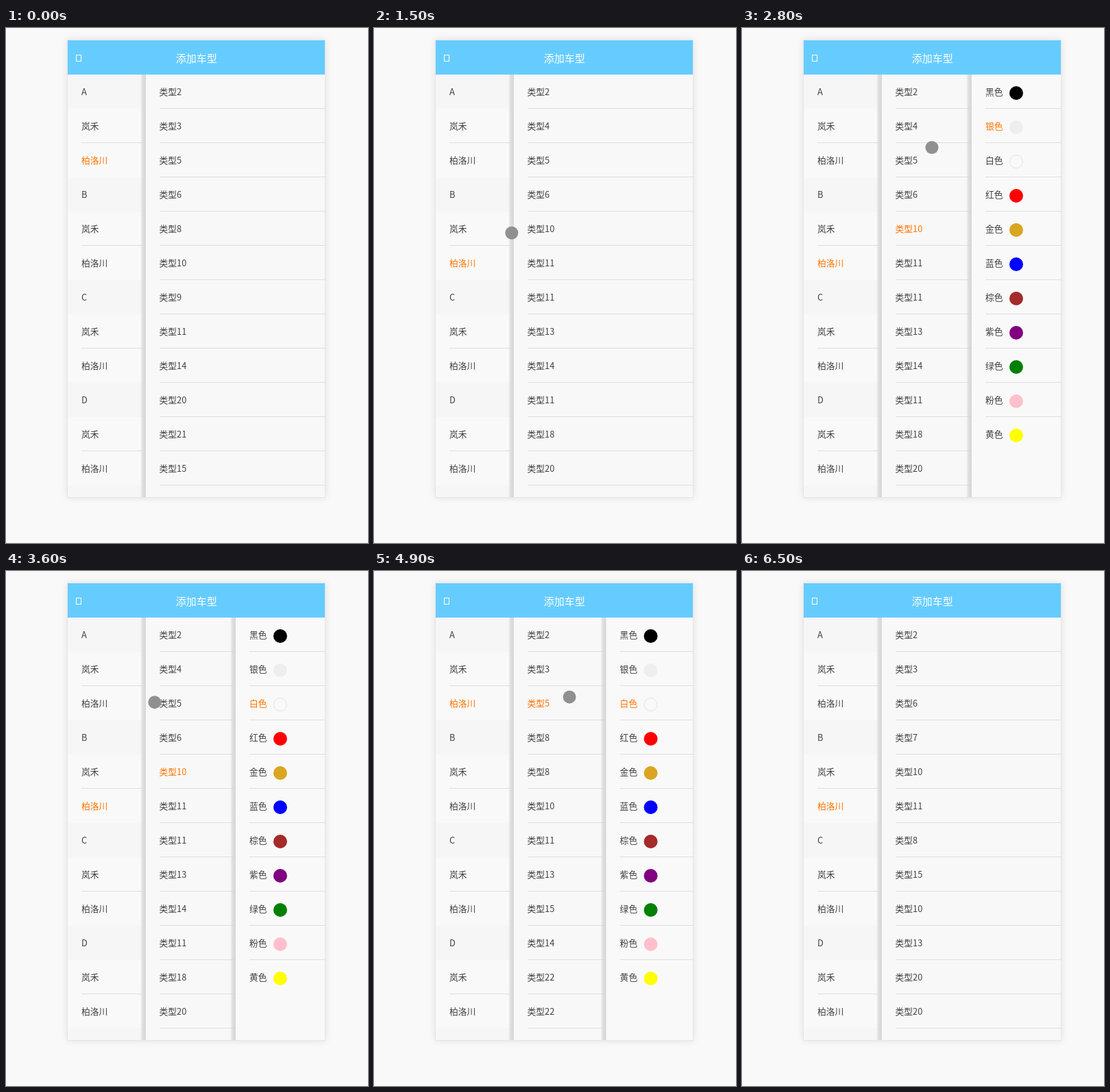
Write an HTML page with a canvas that moves like this. It is 528x752 px and loops after 7500 ms.

```html
<!DOCTYPE html>
<html lang="zh-CN">
<head>
<meta charset="utf-8">
<title>添加车型</title>
<style>
html, body { margin: 0; width: 100%; height: 100%; overflow: hidden; background: #f9f9f9; }
canvas { display: block; }
</style>
</head>
<body>
<canvas id="stage" width="528" height="752"></canvas>
<script>
const ctx = document.getElementById('stage').getContext('2d');
const LOOP = 7500, TICK = 100;
const LEFT = 90, RIGHT = 465, TOP = 68, BOTTOM = 685, ROW = 50, ROWS = 12;
const TYPES_X = 204, DRAWER_WIDTH = 130, SLIDE = 400, TAP = 150;
const FONT = '"Noto Sans CJK SC", "Noto Sans CJK JP", "Noto Sans CJK", sans-serif';
const INK = '#404040', ACTIVE = '#ff7300', LINE = '#dedede';

const brands = ['A', 'B', 'C', 'D'].flatMap(letter => [letter, '岚禾', '柏洛川']);
const colors = Object.entries({
  黑色: 'black', 银色: '#eee', 白色: '#f9f9f9', 红色: 'red', 金色: 'goldenrod', 蓝色: 'blue',
  棕色: 'brown', 紫色: 'purple', 绿色: 'green', 粉色: 'pink', 黄色: 'yellow'
});

// Pointer stops: it waits from at - rest to at + hold, and taps a row where a list is named.
const stops = [
  { at: 100, x: 456, y: 105 },
  { at: 1200, x: 153.5, y: 326.5, rest: 300, list: 'brand', row: 5 },
  { at: 1798, x: 247.5, y: 272.5, list: 'type', row: 4 },
  { at: 2600, x: 138, y: 153, rest: 0 },
  { at: 3250, x: 416, y: 196, rest: 250, list: 'color', row: 2 },
  { at: 3832, x: 141, y: 190, list: 'brand', row: 2 },
  { at: 4585, x: 285.5, y: 183.5, hold: 300, list: 'type', row: 2 },
  { at: 5480, x: 137, y: 333, list: 'brand', row: 5 },
  { at: 6200, x: 460.5, y: 481, rest: 0 },
  { at: 6400, x: 499, y: 78, rest: 0 }
].map(stop => ({ rest: 100, hold: stop.list ? 100 : 0, ...stop }));
const taps = stops.filter(stop => stop.list);

const smooth = k => k * k * (3 - 2 * k);

// CSS "ease": cubic-bezier(.25, .1, .25, 1)
function ease(x) {
  if (x >= 1) return 1;
  const bezier = (a, b, s) => 3 * a * s * (1 - s) ** 2 + 3 * b * s * s * (1 - s) + s ** 3;
  let low = 0, high = 1;
  for (let i = 0; i < 24; i++) {
    const mid = (low + high) / 2;
    if (bezier(.25, .25, mid) < x) low = mid; else high = mid;
  }
  return bezier(.1, 1, low);
}

// Type numbers rise at random down the list; every load has its own seed.
function typeNumber(row, load) {
  const wave = Math.sin((row + 1) * 12.9898 + load * 78.233) * 43758.5453;
  const random = wave - Math.floor(wave);
  return row + 2 + Math.floor(random * (row + 1));
}

function stateAt(t) {
  const state = { brand: 2, type: -1, color: 1, load: 0, openness: 0 };
  for (const tap of taps) {
    if (tap.at > t) break;
    state[tap.list] = tap.row;
    const slide = ease((t - tap.at) / SLIDE);
    if (tap.list === 'type') state.openness = slide;
    if (tap.list === 'brand') {
      if (state.load++) state.openness = 1 - slide;
      state.type = -1;
    }
  }
  return state;
}

function pointerAt(t) {
  const next = stops.findIndex(stop => t <= stop.at + stop.hold);
  if (next < 0 || t < stops[0].at) return null;
  const to = stops[next], from = stops[Math.max(0, next - 1)];
  const leave = from.at + from.hold, arrive = to.at - to.rest;
  const k = t >= arrive ? 1 : smooth((t - leave) / (arrive - leave));
  return [from.x + (to.x - from.x) * k, from.y + (to.y - from.y) * k];
}

function rect(x, y, w, h, fill) {
  ctx.fillStyle = fill;
  ctx.fillRect(x, y, w, h);
}

function circle(x, y, r, fill, stroke) {
  ctx.beginPath();
  ctx.arc(x, y, r, 0, Math.PI * 2);
  ctx.fillStyle = fill;
  ctx.fill();
  if (!stroke) return;
  ctx.strokeStyle = stroke;
  ctx.lineWidth = 1;
  ctx.stroke();
}

function label(text, x, row, active) {
  ctx.font = '12.8px ' + FONT;
  ctx.textAlign = 'left';
  ctx.fillStyle = active ? ACTIVE : INK;
  ctx.fillText(text, x, TOP + row * ROW + 30);
}

function separator(x, end, row) {
  rect(x, TOP + row * ROW + 49, end - x, 1, LINE);
}

function edgeShadow(x) {
  const shade = ctx.createLinearGradient(x - 8, 0, x, 0);
  shade.addColorStop(0, 'rgba(205,205,205,0)');
  shade.addColorStop(.45, 'rgba(212,212,212,.75)');
  shade.addColorStop(1, 'rgba(212,212,212,.9)');
  rect(x - 8, TOP, 8, BOTTOM - TOP, shade);
}

function drawFrame() {
  rect(0, 0, 528, 752, '#f9f9f9');
  ctx.save();
  ctx.shadowColor = 'rgba(0,0,0,.1)';
  ctx.shadowBlur = 10;
  rect(LEFT - 1, 17, RIGHT - LEFT + 2, 669, '#e4e6e8');
  ctx.restore();
  rect(LEFT, 18, RIGHT - LEFT, BOTTOM - 18, '#f8f8f8');
  rect(LEFT, 18, RIGHT - LEFT, 50, '#66ccff');
  ctx.strokeStyle = '#fff';
  ctx.lineWidth = 1;
  ctx.strokeRect(102.5, 39.5, 7, 9);
  ctx.font = '500 15px ' + FONT;
  ctx.textAlign = 'center';
  ctx.fillStyle = '#fff';
  ctx.fillText('添加车型', 277.75, 49.5);
}

function drawBrands(selected) {
  rect(LEFT, TOP, TYPES_X - LEFT, BOTTOM - TOP, '#f6f6f6');
  brands.forEach((name, row) => {
    const kind = row % 3;
    if (kind) rect(LEFT, TOP + row * ROW, TYPES_X - LEFT, ROW, '#f9f9f9');
    label(name, 110, row, row === selected);
    if (kind === 1) separator(110, 199, row);
  });
}

function drawTypes(load, selected, edge) {
  for (let row = 0; row < ROWS; row++) {
    label('类型' + typeNumber(row, load), 223.5, row, row === selected);
    separator(224, edge, row);
  }
  edgeShadow(TYPES_X);
}

function drawDrawer(x, selected) {
  if (x >= RIGHT - .5) return;
  rect(x, TOP, RIGHT - x, BOTTOM - TOP, '#f9f9f9');
  edgeShadow(x);
  colors.forEach(([name, fill], row) => {
    const pale = name === '白色';
    label(name, x + 20, row, row === selected);
    circle(x + 65, TOP + row * ROW + 27, pale ? 9.5 : 10, fill, pale && '#e3e3e3');
    if (row < colors.length - 1) separator(x + 20, RIGHT, row);
  });
}

function drawTap(tap, drawerX) {
  const spans = { brand: [110, 198], type: [225, drawerX - 5], color: [drawerX + 20, RIGHT] };
  const [x, end] = spans[tap.list];
  rect(x, TOP + tap.row * ROW, end - x, ROW, 'rgba(55,191,238,.3)');
}

function drawPointer(t, pressed) {
  const position = pointerAt(t);
  if (!position) return;
  if (pressed) circle(...position, 10.5, 'rgba(255,255,255,.5)');
  circle(...position, 9.5, pressed ? '#6c8089' : '#909090');
}

function draw(t) {
  const state = stateAt(t);
  const drawerX = RIGHT - DRAWER_WIDTH * state.openness;
  const tap = taps.find(({ at }) => t >= at && t < at + TAP);

  drawFrame();
  ctx.save();
  ctx.beginPath();
  ctx.rect(LEFT, TOP, RIGHT - LEFT, BOTTOM - TOP);
  ctx.clip();
  drawBrands(state.brand);
  drawTypes(state.load, state.type, drawerX);
  drawDrawer(drawerX, state.color);
  if (tap) drawTap(tap, drawerX);
  ctx.restore();
  drawPointer(t, tap);
}

const start = performance.now();
function tick() {
  const t = (performance.now() - start) % LOOP;
  draw(Math.floor(t / TICK) * TICK);
  requestAnimationFrame(tick);
}
tick();
</script>
</body>
</html>
```
